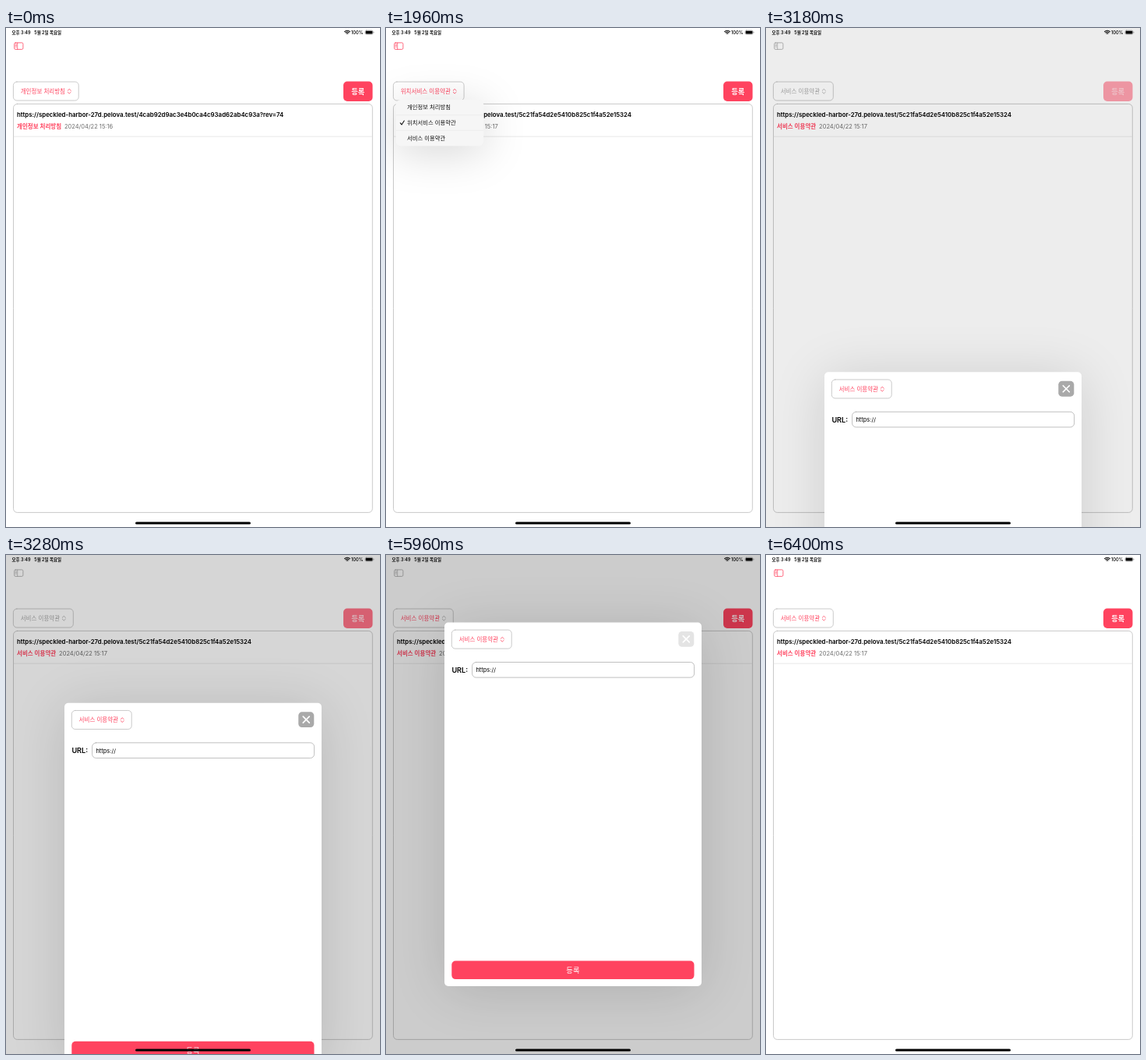
These frames come from a looping animation (480 px wide and 640 px high, 7410 ms). An HTML page with a canvas:

```html
<!DOCTYPE html>
<html lang="ko">
<head>
<meta charset="utf-8">
<title>약관 관리</title>
<style>
html, body { margin: 0; width: 100%; height: 100%; overflow: hidden; background: #fff; }
canvas { display: block; width: 480px; height: 640px; }
</style>
</head>
<body>
<canvas id="stage"></canvas>
<script>
const W = 480, H = 640, LOOP = 7410;
const RED = '#ff435f', GRAY = '#a6a6a6';
const FONT = 'Inter, "Noto Sans CJK KR", "Noto Sans CJK", sans-serif';
const HOST = 'https://speckled-harbor-27d.pelova.test/';
const SHORT_URL = HOST + '5c21fa54d2e5410b825c1f4a52e15324';
const DOCS = [
  { name: '개인정보 처리방침', url: HOST + '4cab92d9ac3e4b0ca4c93ad62ab4c93a?rev=74', date: '2024/04/22 15:16' },
  { name: '위치서비스 이용약관', url: SHORT_URL, date: '2024/04/22 15:17' },
  { name: '서비스 이용약관', url: SHORT_URL, date: '2024/04/22 15:17' }
];

// The picture only changes at these times (ms).
const STEPS = [
  0, 270, 380, 490, 600, 710, 810,
  1160, 1270, 1380, 1490, 1600, 1720, 1850, 1960, 2070, 2310, 2420,
  3060, 3180, 3280, 3380, 3480, 3580,
  5960, 6070, 6180, 6290, 6400
];

const canvas = document.getElementById('stage');
const ctx = canvas.getContext('2d');
const dpr = window.devicePixelRatio || 1;
canvas.width = W * dpr;
canvas.height = H * dpr;

const clamp = v => Math.max(0, Math.min(1, v));
const between = (t, a, b) => t >= a && t < b;
const hold = t => STEPS.reduce((last, s) => s <= t ? s : last, 0);

// Critically damped spring from 0 to 1.
function spring(ms) {
  const x = Math.max(0, ms) * 0.01826;
  return 1 - (1 + x) * Math.exp(-x);
}

function text(str, x, cy, size, color, weight = 400, align = 'left') {
  ctx.font = `${weight} ${size}px ${FONT}`;
  ctx.textAlign = align;
  ctx.fillStyle = color;
  ctx.fillText(str, x, cy + size * 0.36);
  return ctx.measureText(str).width;
}

function box(x, y, w, h, r, fill, stroke, lw = 0.8) {
  ctx.beginPath();
  ctx.roundRect(x, y, w, h, r);
  if (fill) { ctx.fillStyle = fill; ctx.fill(); }
  if (stroke) { ctx.strokeStyle = stroke; ctx.lineWidth = lw; ctx.stroke(); }
}

function line(points, color, lw) {
  ctx.beginPath();
  points.forEach(([x, y]) => ctx.lineTo(x, y));
  ctx.strokeStyle = color;
  ctx.lineWidth = lw;
  ctx.stroke();
}

function shadow(alpha, blur, dy) {
  ctx.shadowColor = `rgba(0,0,0,${alpha})`;
  ctx.shadowBlur = blur * dpr;
  ctx.shadowOffsetY = dy * dpr;
}

function group(alpha, draw) {
  ctx.save();
  ctx.globalAlpha *= alpha;
  draw();
  ctx.restore();
}

function picker(name, x, y, color, iconColor, alpha = 1) {
  ctx.font = `400 7.5px ${FONT}`;
  const w = ctx.measureText(name).width;
  box(x, y, w + 26.5, 24, 4.5, '#fff', '#bdbdbd');
  group(alpha, () => {
    text(name, x + 9.3, y + 12.2, 7.5, color);
    const cx = x + w + 14.5, cy = y + 12.2;
    for (const s of [-1, 1]) {
      line([[cx - 2, cy + s], [cx, cy + s * 2.9], [cx + 2, cy + s]], iconColor, 0.8);
    }
  });
}

function statusBar() {
  text('오후 3:49', 7.5, 5.6, 5.5, '#000', 600);
  text('5월 2일 목요일', 36.3, 5.6, 5.5, '#000', 600);
  for (const r of [1.2, 3, 4.8]) {
    ctx.beginPath();
    ctx.arc(438, 8, r, -Math.PI * 0.75, -Math.PI * 0.25);
    ctx.strokeStyle = '#000';
    ctx.lineWidth = 1.1;
    ctx.stroke();
  }
  text('100%', 443, 5.6, 5.7, '#000', 500);
  box(461, 3.1, 10, 5, 1.6, null, '#777', 0.5);
  box(461.6, 3.7, 8.8, 3.8, 1.1, '#000');
  box(471.6, 4.8, 0.7, 1.6, 0.3, '#777');
}

function sidebarIcon(color) {
  box(10.7, 18.9, 11.2, 8.5, 1.5, null, color, 0.8);
  line([[14.7, 19], [14.7, 27.4]], color, 0.7);
  for (const y of [21, 22.6, 24.2]) line([[11.8, y], [13.6, y]], color, 0.6);
}

function page(t) {
  const label = DOCS[t < 1160 ? 0 : t < 2310 ? 1 : 2];
  const item = DOCS[t < 1270 ? 0 : t < 2420 ? 1 : 2];
  const pressed = between(t, 270, 490) || between(t, 1490, 1720);

  sidebarIcon(between(t, 3180, 6070) ? GRAY : RED);
  picker(label.name, 9.4, 69, between(t, 3180, 5960) ? GRAY : RED,
    between(t, 3180, 6070) ? GRAY : RED, pressed ? 0.35 : 1);

  const press = between(t, 3060, 3380) ? 0.2 + 0.8 * clamp((t - 3060) / 320) : 1;
  group(press, () => {
    box(433, 68.5, 37.5, 25.5, 5, RED);
    text('등록', 451.7, 81.2, 9.2, '#fff', 600, 'center');
  });

  box(9.5, 97.4, 460.8, 524, 5, null, '#b4b4b4', 0.7);
  text(item.url, 14, 111.5, 7.86, '#000', 600);
  const w = text(item.name, 14, 126, 7.5, RED, 600);
  text(item.date, 14 + w + 3.9, 126, 7.5, '#6c6c6c');
  line([[9.8, 139.2], [470, 139.2]], '#dcdcdc', 0.6);
}

function menu(p, checked, lit) {
  if (p <= 0) return;
  const x = 12.5, y = 92, w = 113, rowH = 19.8, h = rowH * 3;
  const scale = 0.25 + 0.75 * p;
  ctx.save();
  ctx.globalAlpha = clamp(p * 1.6);
  ctx.translate(x + 40, y);
  ctx.scale(scale, scale);
  ctx.translate(-x - 40, -y);
  ctx.save();
  shadow(0.17, 56, 8);
  box(x, y, w, h, 6, '#f6f6f6');
  ctx.restore();
  ctx.beginPath();
  ctx.roundRect(x, y, w, h, 6);
  ctx.clip();
  DOCS.forEach((doc, i) => {
    const top = y + i * rowH, cy = top + rowH / 2;
    if (i === lit) box(x, top, w, rowH, 0, '#dadada');
    if (i) line([[x, top], [x + w, top]], '#e2e2e2', 0.5);
    text(doc.name, 27, cy, 7.35, '#111');
    if (i === checked) {
      line([[18.2, cy + 0.3], [20, cy + 2.4], [23.2, cy - 2.6]], '#111', 1.1);
    }
  });
  ctx.restore();
}

function menus(t) {
  if (t < 1380) {
    const p = t < 1270 ? spring(t - 340) : 0.4;
    menu(p, 0, t >= 1160 ? 1 : -1);
  } else if (t < 2420) {
    menu(spring(t - 1560), 1, t >= 2310 ? 2 : -1);
  }
}

function sheet(t) {
  if (!between(t, 3180, 6400)) return;
  const shown = t < 6000 ? spring(t - 3111) : 1 - spring(t - 6011);
  const x = 75, y = 86.5 + 553.5 * (1 - shown);

  ctx.fillStyle = `rgba(0,0,0,${0.2 * shown})`;
  ctx.fillRect(0, 0, W, H);
  ctx.save();
  shadow(0.14, 70, 6);
  box(x, y, 330, 466.5, 5, '#fff');
  ctx.restore();

  picker(DOCS[2].name, 84.3, y + 9.6, RED, RED);

  box(375.3, y + 11.5, 20, 19.8, 4.5, between(t, 5960, 6070) ? '#e4e4e4' : '#a9a9a9');
  const cx = 385.3, cy = y + 21.4, d = 4;
  line([[cx - d, cy - d], [cx + d, cy + d]], '#fff', 1.7);
  line([[cx - d, cy + d], [cx + d, cy - d]], '#fff', 1.7);

  text('URL:', 84.4, y + 61, 9.1, '#000', 600);
  box(110.6, y + 51, 285, 19.6, 5, '#fff', '#b0b0b0');
  text('https://', 115.4, y + 61, 7.5, '#000');

  box(84.3, y + 434, 311.2, 23.6, 5, RED);
  text('등록', 240, y + 446, 9.4, '#fff', 400, 'center');
}

function draw(t) {
  ctx.setTransform(dpr, 0, 0, dpr, 0, 0);
  ctx.lineCap = ctx.lineJoin = 'round';
  ctx.fillStyle = '#fff';
  ctx.fillRect(0, 0, W, H);
  page(t);
  menus(t);
  sheet(t);
  statusBar();
  box(166, 633.4, 148, 3, 1.5, '#000');
}

const start = performance.now();
function tick() {
  draw(hold((performance.now() - start) % LOOP));
  requestAnimationFrame(tick);
}
tick();
</script>
</body>
</html>
```
